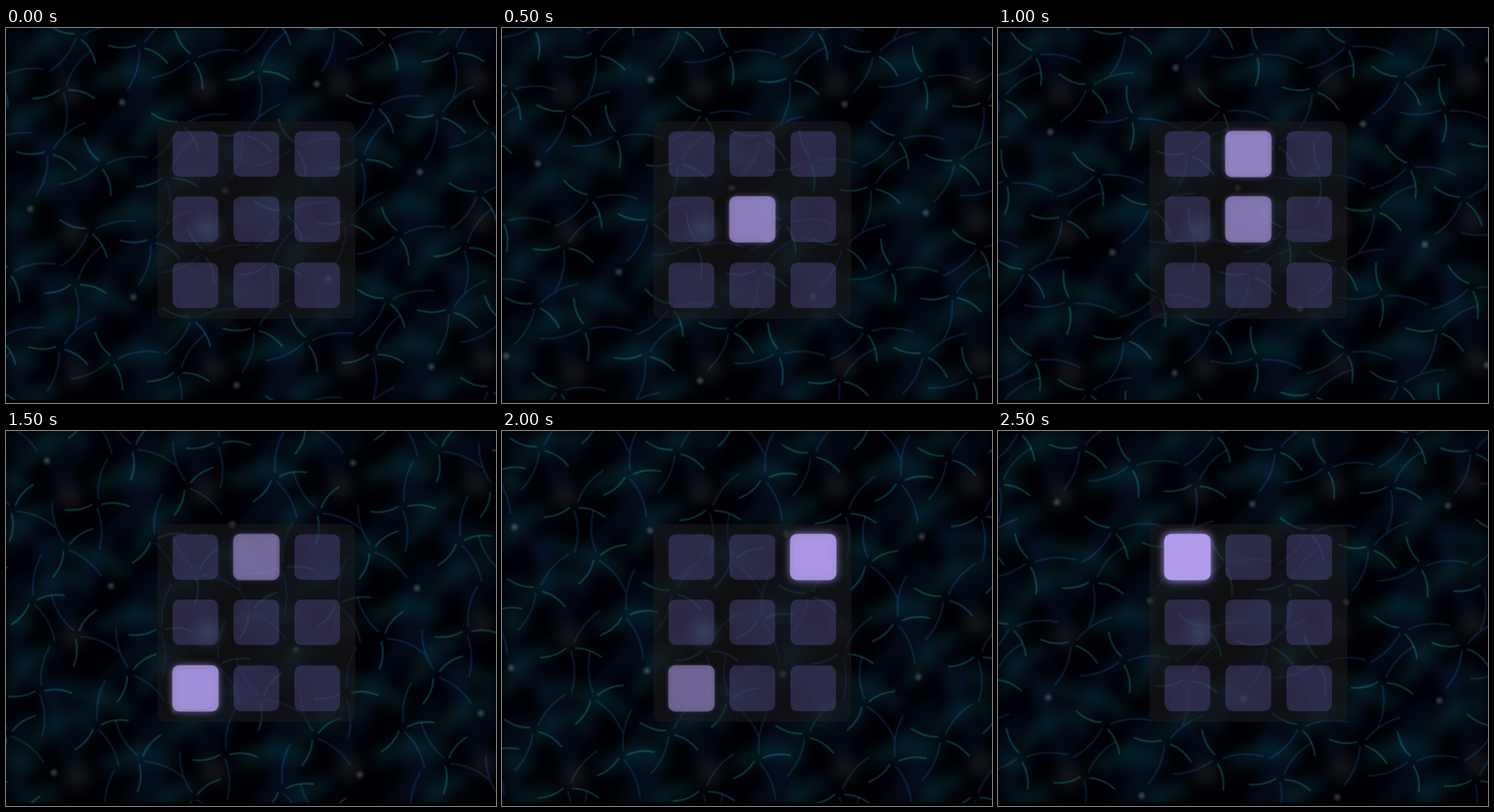
Write an HTML page with a canvas that moves like this. It is 644 by 494 pixels and loops after 3000 ms.

```html
<!DOCTYPE html>
<html lang="en">
<head>
<meta charset="utf-8">
<title>Memory grid</title>
<style>
  html, body { margin: 0; width: 100%; height: 100%; overflow: hidden; background: #000; }
  canvas { display: block; }
</style>
</head>
<body>
<canvas id="stage" width="644" height="494"></canvas>
<script>
const stage = document.getElementById('stage');
const ctx = stage.getContext('2d');
const STEP = 500, CELL_W = 178.5, CELL_H = 185;
const rad = degrees => degrees * Math.PI / 180;

// Pattern angle and anchor for each step; lit squares have a column, row and level.
const poses = [
  { angle: 40.6, x: 288, y: 214, lit: [] },
  { angle: 53.3, x: 302, y: 211, lit: [[1, 1, .63]] },
  { angle: 62.8, x: 315, y: 211, lit: [[1, 0, .66], [1, 1, .58]] },
  { angle: -27, x: 381, y: 288, lit: [[1, 0, .5], [0, 2, .77]] },
  { angle: 1.3, x: 369, y: 320, lit: [[2, 0, .87], [0, 2, .47]] },
  { angle: 46.5, x: 323, y: 353, lit: [[0, 0, 1]] }
];

// A pattern cell holds four bursts of curved arms around one pale dot.
const bursts = [
  { x: 78, y: -30, turn: -52, spread: 70 },
  { x: -30, y: 112, turn: -80, spread: 73 },
  { x: 33, y: 80, turn: -50, spread: 82 },
  { x: -70, y: 36, turn: -95, spread: 72 }
];

function arm(c, reach, width, color) {
  c.beginPath();
  c.moveTo(7, 0);
  c.quadraticCurveTo(reach * .55, -reach * .14, reach, 0);
  c.strokeStyle = color;
  for (const scale of [1, 2]) {
    c.lineWidth = width * scale;
    c.stroke();
  }
}

function drawCell(c, width) {
  for (const { x, y, turn, spread } of bursts)
    for (let k = 0; k < 4; k++) {
      const short = k % 2;
      c.save();
      c.translate(x, y);
      c.rotate(rad(turn + spread * k));
      arm(c, short ? 42 : 60, width, short ? 'rgba(15,115,120,.2)' : 'rgba(12,50,90,.22)');
      c.restore();
    }
  const radius = 4 + 1.5 * width;
  const fade = c.createRadialGradient(0, 0, 0, 0, 0, radius);
  fade.addColorStop(0, 'rgba(110,125,125,.5)');
  fade.addColorStop(1, 'rgba(110,125,125,0)');
  c.fillStyle = fade;
  c.fillRect(-radius, -radius, 2 * radius, 2 * radius);
}

function drawPattern(c, { angle, x, y }, width) {
  c.save();
  c.globalCompositeOperation = 'lighter';
  c.lineCap = 'round';
  c.translate(x, y);
  c.rotate(rad(angle));
  for (let row = -4; row <= 4; row++)
    for (let column = -4; column <= 4; column++) {
      c.save();
      c.translate(column * CELL_W, row * CELL_H);
      drawCell(c, width);
      c.restore();
    }
  c.restore();
}

// The same pattern, heavy and blurred, stays still behind the moving one.
const haze = document.createElement('canvas');
haze.width = stage.width;
haze.height = stage.height;
const hazeCtx = haze.getContext('2d');
drawPattern(hazeCtx, { angle: -1.8, x: 267, y: 265 }, 10);

function drawBackground(pose) {
  ctx.fillStyle = '#000';
  ctx.fillRect(0, 0, 644, 494);
  ctx.save();
  ctx.beginPath();
  ctx.rect(0, 0, 644, 490);
  ctx.clip();
  ctx.fillStyle = '#000005';
  ctx.fillRect(0, 0, 644, 490);
  ctx.filter = 'blur(10px)';
  ctx.globalAlpha = .75;
  ctx.drawImage(haze, 0, 0);
  ctx.filter = 'none';
  ctx.globalAlpha = 1;
  drawPattern(ctx, pose, 1.6);

  const glow = ctx.createRadialGradient(264, 266, 0, 264, 266, 27);
  glow.addColorStop(0, 'rgba(50,115,150,.5)');
  glow.addColorStop(1, 'rgba(50,115,150,0)');
  ctx.fillStyle = glow;
  ctx.fillRect(237, 239, 54, 54);
  ctx.restore();
}

function roundBox(x, y, size, radius, color) {
  ctx.fillStyle = color;
  ctx.beginPath();
  ctx.roundRect(x, y, size, size, radius);
  ctx.fill();
}

function drawSquare(column, row, level) {
  const x = 219 + 80 * column, y = 136 + Math.round(86.4 * row);
  if (!level) return roundBox(x, y, 60, 9, 'rgba(98,90,165,.34)');
  const color = `rgba(176,155,234,${level})`;
  ctx.save();
  ctx.shadowColor = color;
  ctx.shadowBlur = 12 * level;
  roundBox(x - .5, y - .5, 61, 9, color);
  ctx.restore();
}

function draw(pose) {
  drawBackground(pose);
  roundBox(199, 123, 260, 11, 'rgba(30,28,28,.5)');
  for (let row = 0; row < 3; row++)
    for (let column = 0; column < 3; column++) {
      const lit = pose.lit.find(([c, r]) => c === column && r === row);
      drawSquare(column, row, lit ? lit[2] : 0);
    }
}

let shown = -1;
const start = performance.now();

function tick() {
  const step = Math.floor((performance.now() - start) / STEP) % poses.length;
  if (step !== shown) draw(poses[shown = step]);
  requestAnimationFrame(tick);
}
tick();
</script>
</body>
</html>
```
